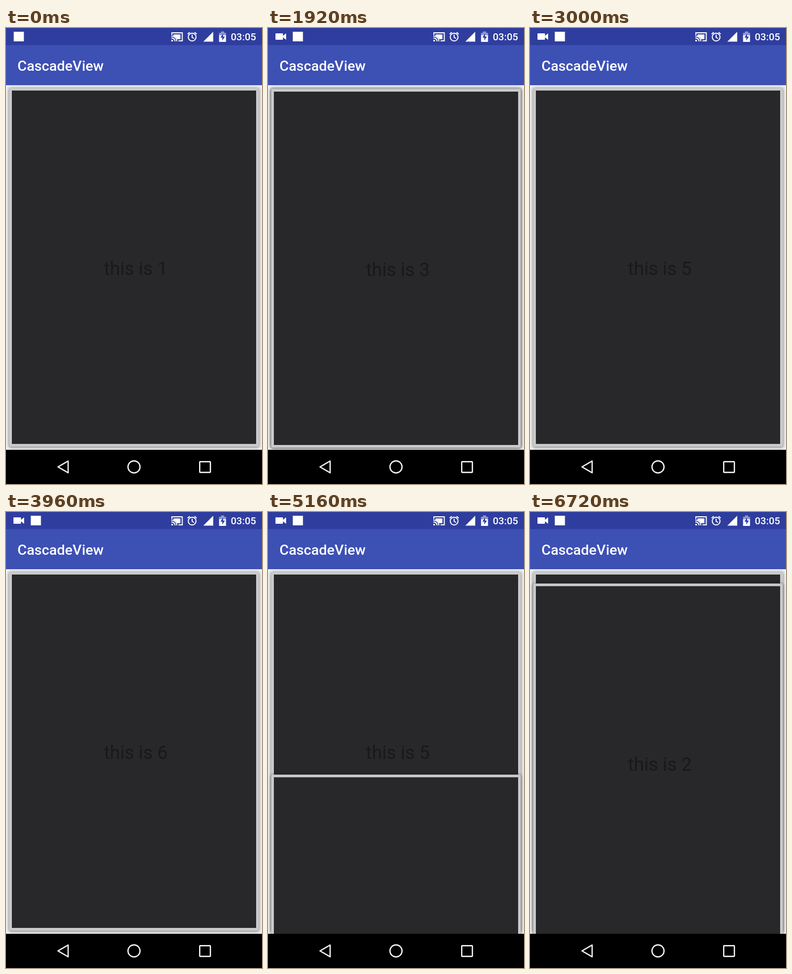
Write an HTML page that moves like this. It is 480x853 px and loops after 6840 ms.

```html
<!DOCTYPE html>
<html lang="en">
<head>
<meta charset="utf-8">
<title>CascadeView</title>
<style>
  html, body { margin: 0; width: 100%; height: 100%; overflow: hidden; background: #000; }
  #stage { position: relative; width: 480px; height: 853px; overflow: hidden; font-family: Roboto, sans-serif; }
  #stage > svg { position: absolute; inset: 0; }
  #pages { position: absolute; top: 107px; width: 480px; height: 682px; overflow: hidden; background: #f0f0f0; }
  .card {
    position: absolute; left: 6px; top: 5px; width: 458px; height: 660.5px;
    border: 5px solid #c9cacb; border-top-width: 5.5px; border-radius: 3px;
    background: #28282a; background-clip: padding-box;
    box-shadow: 0 1px 5px 1px rgba(0, 0, 0, .42);
  }
  .card span {
    position: absolute; left: 172.5px; top: 313px; line-height: 41px;
    font-size: 34.67px; white-space: pre; color: #19191b;
  }
</style>
</head>
<body>
<div id="stage">
  <div id="pages"></div>
  <svg width="480" height="853" viewBox="0 0 480 853">
    <rect width="480" height="32" fill="#2f3e9e"/>
    <rect y="32" width="480" height="75" fill="#3d50b4"/>
    <rect y="789" width="480" height="64"/>
    <g fill="#fff" font-weight="500">
      <text x="21.5" y="79.5" font-size="26.67">CascadeView</text>
      <text x="421.5" y="23" font-size="18.67">03:05</text>
      <path id="camera" d="M15 10h12q1 0 1 1v3.5l6-4.5v12l-6-4.500v3.500q0 1-1 1h-12q-1 0-1-1v-10q0-1 1-1z"/>
      <rect id="notice" x="14.500" y="7" width="19" height="18"/>
      <path d="M370 25.500L388.500 7v18.500z"/>
      <path d="M314 12h13v9h-6q-2-5-7-6z"/>
      <path d="M310 22q3.500 0 3.500 3h-3.500z"/>
    </g>
    <g fill="none" stroke="#fff" stroke-width="1.900">
      <path d="M311 13v-4h19.500v15h-7M310 18.500q6.500.500 7 6.500M310 15q10 .500 10.500 10"/>
      <circle cx="349" cy="17" r="7.300"/>
      <path d="M349 12.500v5l3.500 2M340.500 11.500l4-3.500M357.500 11.500l-4-3.500"/>
    </g>
    <path d="M399.500 9h3.500v-2.500h6v2.500h3.500v5h-13z" fill="#8f98cc"/>
    <path d="M399.500 13.500h13v12.500h-13z" fill="#fff"/>
    <path d="M407 10.500l-5 7.500h3.500v5.500l5-7.500h-3.500z" fill="#2f3e9e"/>
    <g fill="none" stroke="#f4f4f4" stroke-width="2.400">
      <path d="M97.500 821L116.500 810v22z" stroke-linejoin="round"/>
      <circle cx="240" cy="821" r="11.300"/>
      <rect x="363.200" y="811.200" width="20" height="20" rx="1"/>
    </g>
  </svg>
</div>
<script>
  const LOOP = 6840, STEP = 120, PITCH = 682, BACK = 4080;

  // [time in ms, scroll position in cards]
  const keys = [
    [0, 0], [840, 1], [960, 1], [1680, 1.997], [1920, 1.997], [2280, 3],
    [2520, 3], [3000, 4], [3120, 4], [3600, 4.999], [3840, 4.999], [3960, 5],
    [BACK, 5], [4680, 4.85], [5160, 4.444], [5400, 4], [5820, 3], [6240, 2],
    [6600, 1], [6720, 0.968]
  ];

  const pages = document.getElementById('pages');
  const camera = document.getElementById('camera');
  const notice = document.getElementById('notice');

  const cards = Array.from({ length: 6 }, (_, i) => {
    const card = document.createElement('div');
    card.className = 'card';
    card.innerHTML = `<span>this is ${i + 1}</span>`;
    return pages.appendChild(card);
  });

  function scrollAt(t) {
    const next = keys.findIndex(([time]) => time > t);
    if (next < 0) return keys[keys.length - 1][1];
    const [t0, p0] = keys[next - 1], [t1, p1] = keys[next];
    const u = (t - t0) / (t1 - t0);
    const eased = t < BACK ? u * u * (3 - 2 * u) : u;
    return p0 + (p1 - p0) * eased;
  }

  function draw(now) {
    const t = Math.floor((now % LOOP) / STEP) * STEP;
    const pos = scrollAt(t);
    cards.forEach((card, i) => {
      card.style.transform = `translateY(${Math.max(0, i - pos) * PITCH}px)`;
      // Only the covered card and those above it are drawn.
      card.style.visibility = i < Math.floor(pos) ? 'hidden' : 'visible';
    });
    const recording = t >= STEP;
    camera.style.visibility = recording ? 'visible' : 'hidden';
    notice.setAttribute('x', recording ? 46.5 : 14.5);
  }

  const start = performance.now();
  function tick() {
    draw(performance.now() - start);
    requestAnimationFrame(tick);
  }
  tick();
</script>
</body>
</html>
```
